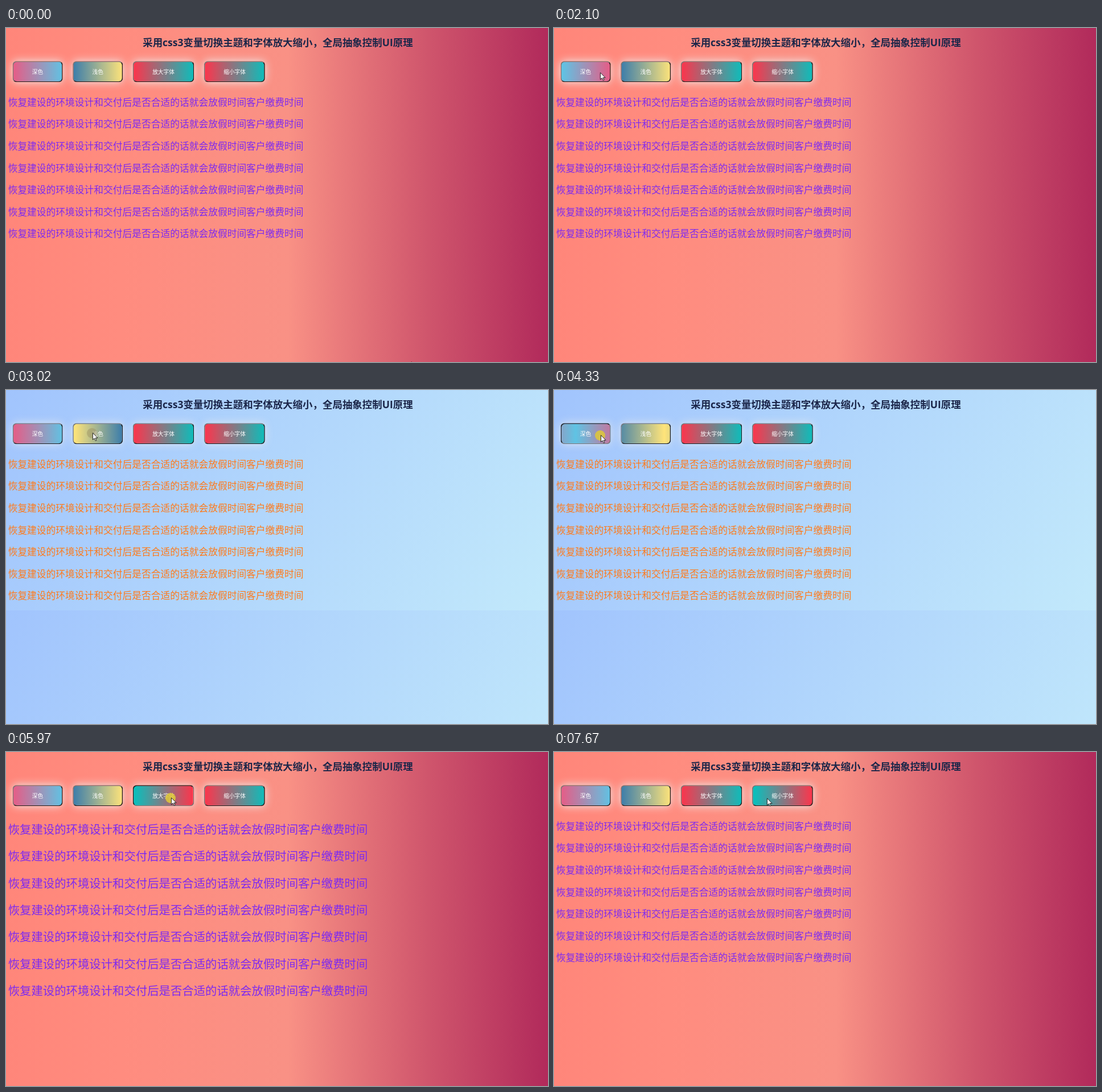
Write an HTML page that moves like this. It is 952x588 px and loops after 8 s.

```html
<!DOCTYPE html>
<html lang="zh-CN">
<head>
<meta charset="utf-8">
<title>主题切换</title>
<style>
html, body { margin: 0; width: 100%; height: 100%; overflow: hidden; }
#stage {
  position: relative; width: 952px; height: 588px; overflow: hidden;
  --ink: #7d2af0; --glow: #eee;
  background: linear-gradient(to right, #ff867a 0%, #ff8c7f 21%, #f99185 52%, #cf556c 78%, #b12a5b 100%);
}
#stage.light {
  --ink: #ff7a1a; --glow: rgba(238, 238, 238, .8);
  background: linear-gradient(120deg, #a1c4fd 0%, #c2e9fb 100%) 0 0 / 100% 388px;
}
#page {
  position: absolute; left: 0; top: 0; width: 1308px; height: 808px;
  transform: scale(.7278); transform-origin: 0 0;
  font-family: "Noto Sans CJK SC", "Noto Sans CJK", sans-serif;
}
h2 {
  position: absolute; left: 2px; top: 19px; width: 1308px; margin: 0;
  font: bold 24px/32px "Open Sans", "Noto Sans CJK SC", "Noto Sans CJK", sans-serif;
  text-align: center; white-space: nowrap; color: #1b2649;
}
nav { position: absolute; left: 16px; top: 80px; display: flex; gap: 24.5px; }
.btn {
  height: 51px; box-sizing: border-box;
  padding: 15px 45px; border: 2px solid; border-color: #767676 #1c1c1c #1c1c1c #767676;
  border-radius: 10px; box-shadow: 0 0 20px var(--glow);
  font-size: 13.333px; line-height: 17px; white-space: nowrap; color: #fff;
  --a: #fc354c; --b: #0abfbc;
  background: linear-gradient(to right, var(--a) 0%, var(--b) 51%, var(--a) 100%) 0 50% / 200% auto;
}
.rose { --a: #e55d87; --b: #5fc3e4; }
.sand { --a: #3d7eaa; --b: #ffe47a; }
.btn.down { border-color: #1c1c1c #767676 #767676 #1c1c1c; }
#text { position: absolute; left: 5px; top: 141px; color: var(--ink); font-weight: 350; }
#text p {
  position: relative; top: -.05em; margin: 1em 0;
  line-height: var(--line); white-space: nowrap;
}
#dot {
  position: absolute; left: -10px; top: -8px; width: 18px; height: 18px;
  border-radius: 50%; background: rgba(222, 200, 58, .87);
}
#dot.fade { background: rgba(150, 135, 90, .4); }
#arrow { position: absolute; left: 0; top: 0; overflow: visible; }
</style>
</head>
<body>
<div id="stage">
  <div id="page">
    <h2>采用css3变量切换主题和字体放大缩小，全局抽象控制UI原理</h2>
    <nav>
      <div class="btn rose">深色</div>
      <div class="btn sand">浅色</div>
      <div class="btn">放大字体</div>
      <div class="btn">缩小字体</div>
    </nav>
    <div id="text"></div>
  </div>
  <div id="dot"></div>
  <svg id="arrow" width="10" height="15">
    <path d="M.4.6V12.6L3.2 10 5.2 14.3 7 13.5 5.1 9.4H9Z" fill="#fff" stroke="#111" stroke-width=".9"/>
  </svg>
</div>
<script>
const LOOP = 8000, PRESS = 85, HOVER = 500;
const $ = id => document.getElementById(id);
const stage = $('stage'), text = $('text'), dot = $('dot'), arrow = $('arrow');
const buttons = [...document.querySelectorAll('.btn')];

text.innerHTML = '<p>恢复建设的环境设计和交付后是否合适的话就会放假时间客户缴费时间</p>'.repeat(7);

// Pointer glides: when, where to, and the button it lands on
const glides = [
  { from: 0, to: 850, x: 104, y: 88 },
  { from: 850, to: 1000, x: 81, y: 78, button: 0 },
  { from: 2100, to: 2850, x: 152, y: 75, button: 1 },
  { from: 4000, to: 4230, x: 82, y: 79, button: 0 },
  { from: 4820, to: 5190, x: 290, y: 80, button: 2 },
  { from: 6350, to: 6950, x: 374, y: 81, button: 3 }
];

// Each click acts on the button under the pointer when released
const clicks = [
  { at: 1630 }, { at: 3020, linger: 1000 }, { at: 4400 }, { at: 5570 },
  { at: 6050 }, { at: 7210 }, { at: 7670 }
];
const actions = [
  s => { s.light = false; },
  s => { s.light = true; },
  s => { s.size += 5; },
  s => { s.size -= 5; }
];

const clamp = v => Math.min(1, Math.max(0, v));
const smooth = u => u * u * (3 - 2 * u);
const gliding = t => glides.findLast(g => t >= g.from);

// CSS "ease" curve
function ease(x) {
  let lo = 0, hi = 1;
  for (let i = 0; i < 20; i++) {
    const u = (lo + hi) / 2;
    if (.75 * u * (1 - u) + u ** 3 < x) lo = u; else hi = u;
  }
  return .3 * lo * (1 - lo) ** 2 + 3 * lo * lo * (1 - lo) + lo ** 3;
}

function pointer(t) {
  let x = 712, y = 587;
  for (const g of glides) {
    const s = smooth(clamp((t - g.from) / (g.to - g.from)));
    x += (g.x - x) * s;
    y += (g.y - y) * s;
  }
  return [x, y];
}

// A glide leaves the old button early and enters the new one halfway
function hover(button, t) {
  const along = (g, part) => g.from + (g.to - g.from) * part;
  const fade = start => ease(clamp((t - start) / HOVER));
  return glides.reduce((sum, g, i) => {
    if (g.button !== button) return sum;
    const next = glides[i + 1];
    return sum + fade(along(g, .5)) - (next ? fade(along(next, .2)) : 0);
  }, 0);
}

const place = (el, x, y) => { el.style.transform = `translate(${x}px, ${y}px)`; };

function draw(now) {
  const t = now % LOOP;
  const state = { light: false, size: 23 };
  for (const c of clicks) if (t >= c.at) actions[gliding(c.at).button](state);

  stage.classList.toggle('light', state.light);
  text.style.fontSize = state.size + 'px';
  text.style.setProperty('--line', Math.round(state.size * 1.32) + 'px');

  const click = clicks.find(c => t >= c.at - PRESS && t < c.at + (c.linger ?? 0));
  const down = click && t < click.at;
  const tip = pointer(t);
  dot.style.display = click ? 'block' : 'none';
  dot.classList.toggle('fade', !down);
  place(dot, ...tip);
  place(arrow, ...tip);

  buttons.forEach((b, i) => {
    b.style.backgroundPosition = `${hover(i, t) * 100}% 50%`;
    b.classList.toggle('down', Boolean(down && gliding(t).button === i));
  });
  requestAnimationFrame(draw);
}
requestAnimationFrame(draw);
</script>
</body>
</html>
```
